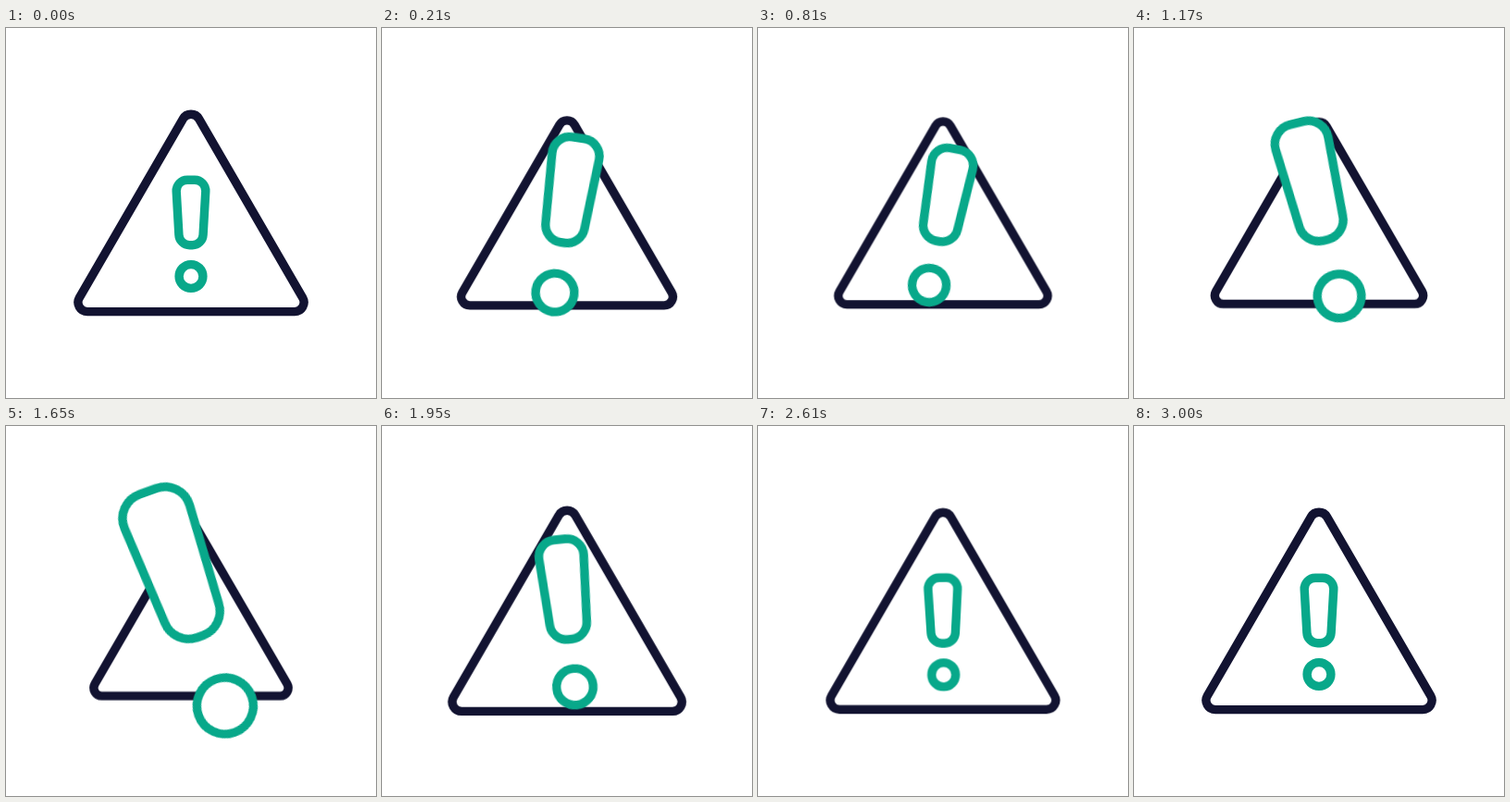
Recreate the animation shown at these times as an HTML page without scripts. Size 400 by 400 pixels, loop 3.03 s.

```html
<!DOCTYPE html>
<html lang="en">
<head>
<meta charset="utf-8">
<title>Warning</title>
<style>
  html, body { margin: 0; height: 100%; overflow: hidden; background: #fff; }
  svg { display: block; width: 100%; height: 100%; }

  path, circle { stroke-width: 9.4; stroke-linejoin: round; vector-effect: non-scaling-stroke; }
  .sign { fill: none; stroke: #121331; }
  .mark { fill: #fff; stroke: #08a88a; }

  .sign, .mark, .mark > * {
    transform-origin: 200px 200px;
    animation: 3030ms infinite;
    animation-timing-function: cubic-bezier(.37, 0, .63, 1);
  }
  .sign { animation-name: pulse; }
  .mark { animation-name: swing; }
  .mark > * { animation-name: zoom; }

  @keyframes pulse {
    0% { transform: scale(1); }
    14.85% { transform: scale(.861); }
    31.35% { transform: scale(.941); }
    54.1% { transform: scale(.861); }
    72.28% { transform: scale(1.12); }
    88.5% { transform: scale(.992); }
    99%, 100% { transform: scale(1); }
  }

  @keyframes swing {
    0% { transform: rotate(0deg); }
    14.85% { transform: rotate(19.1deg); animation-timing-function: cubic-bezier(.52, 0, .26, 1); }
    54.1% { transform: rotate(-19.8deg); }
    73% { transform: rotate(4.5deg); }
    89.1% { transform: rotate(-1deg); }
    99%, 100% { transform: rotate(0deg); }
  }

  @keyframes zoom {
    0% { transform: translateY(0) scale(1); }
    14.85% { transform: translateY(-53.3px) scale(2.38); }
    29.7% { transform: translateY(-15.5px) scale(1.34); animation-timing-function: cubic-bezier(.35, 0, .3, 1); }
    54.1% { transform: translateY(-53px) scale(2.365); }
    73% { transform: translateY(0) scale(.91); }
    89.1% { transform: translateY(0) scale(1.015); }
    99%, 100% { transform: translateY(0) scale(1); }
  }
</style>
</head>
<body>
<svg viewBox="0 0 400 400" role="img" aria-label="Warning sign">
  <path class="sign" d="M191.3 98.3L79.3 291.6A10 10 0 0 0 88 306.6H312A10 10 0 0 0 320.7 291.6L208.7 98.3A10 10 0 0 0 191.3 98.3Z"/>
  <g class="mark">
    <path d="M196 164.2H204A11.8 11.8 0 0 1 215.8 176.6L213.1 223.5A11.8 11.8 0 0 1 201.5 234.8H198.5A11.8 11.8 0 0 1 186.9 223.5L184.2 176.6A11.8 11.8 0 0 1 196 164.2Z"/>
    <circle cx="200" cy="268.5" r="12.9"/>
  </g>
</svg>
</body>
</html>
```
